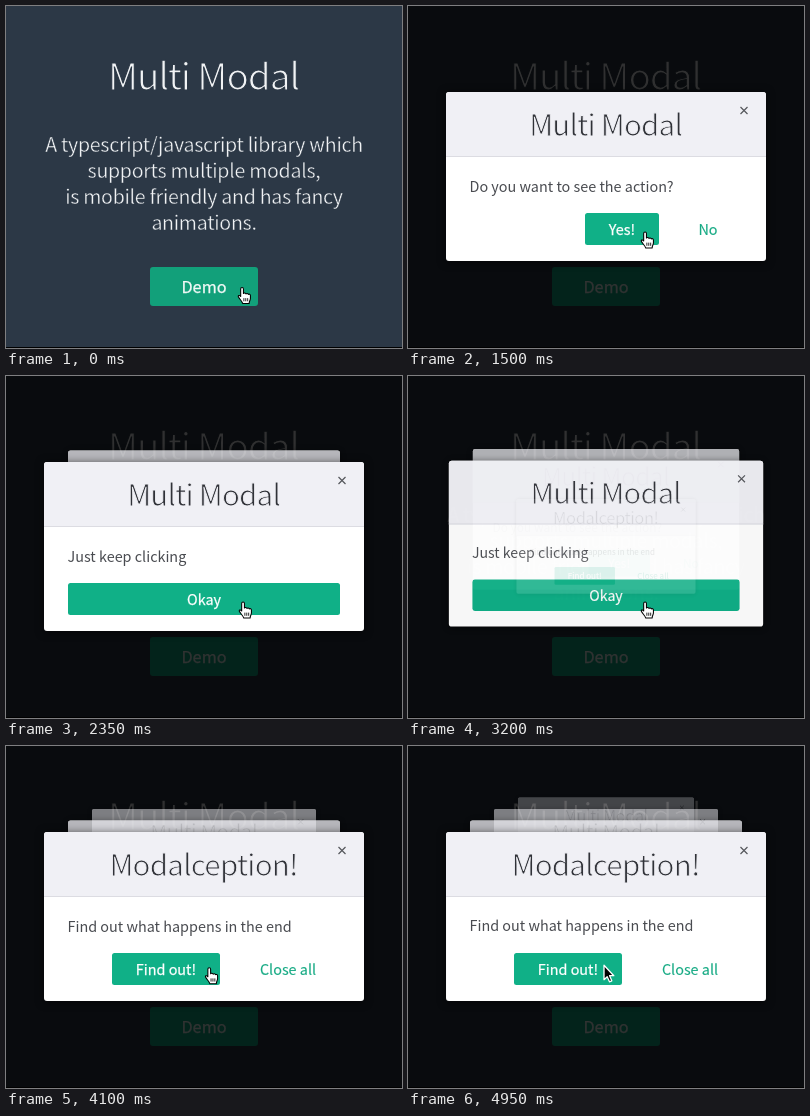
Write an HTML page that moves like this. It is 396 px wide and 342 px high and loops after 5000 ms.

```html
<!DOCTYPE html>
<html lang="en">
<head>
<meta charset="utf-8">
<title>Multi Modal</title>
<style>
  html, body { margin: 0; width: 100%; height: 100%; overflow: hidden; background: #2c3846; }
  svg { display: block; width: 396px; height: 342px; }
  text { font: 14.4px "Noto Sans CJK JP", "Noto Sans CJK SC", "Noto Sans CJK", sans-serif; fill: #494b50; }
  .mid { text-anchor: middle; }
  /* Strokes in the background colour thin the letters */
  .page { fill: #f1f3f5; stroke: #2c3846; }
  .title { letter-spacing: -.027em; }
  .page.title { font-size: 37px; stroke-width: 1.1px; }
  .page.intro { font-size: 19.6px; stroke-width: .35px; letter-spacing: -.015em; }
  .modal .title { font-size: 29.6px; fill: #303238; stroke: #f0f0f5; stroke-width: .9px; }
  .button { fill: #10b087; }
  .hover { fill: #12a07a; }
  .label { fill: #fff; stroke: #fff; stroke-width: .25px; }
  .demo { font-size: 16.3px; fill: #f1f8f6; }
  .link { fill: #18ab85; stroke: #18ab85; stroke-width: .15px; }
  .panel { fill: #fff; filter: drop-shadow(0 1px 4px #0009); }
</style>
</head>
<body>
<svg viewBox="0 0 396 342">
  <rect width="396" height="342" fill="#2c3846"/>
  <text class="page title mid" x="197.5" y="84">Multi Modal</text>
  <g id="intro"></g>
  <rect id="demo" x="144" y="261" width="108" height="39" rx="3"/>
  <text class="label demo mid" x="198" y="287">Demo</text>
  <rect id="shade" width="396" height="342"/>
  <g id="modals"></g>
  <g id="cursor" stroke-linejoin="round">
    <g id="hand" transform="translate(-3 2) scale(1.06)" stroke="#000">
      <path fill="#fff" d="M3 9V1.8a1.3 1.3 0 0 1 2.6 0V6.2c.3-.9 2.2-.8 2.4.3c.5-.7 2-.5 2.2.5c.6-.5 2-.2 2 1V10.5c0 2-1.2 3-1.2 5H4.8C4.5 13.5 2.2 11.8.9 9.5C.2 8.2 1.6 7.2 3 9z"/>
      <path stroke-width=".8" d="M6 10.5v3M7.8 10.5v3M9.6 10.5v3"/>
    </g>
    <path id="arrow" stroke="#fff" stroke-width="1.3" d="M.5 .8V15.2L3.7 12.2L6 17.3L8.3 16.3L6.1 11.2H10.3z"/>
  </g>
  <rect y="341" width="396" height="1"/>
</svg>
<script>
const LOOP = 5000, OPEN_TIME = 400, SHADE_TIME = 300;
const CX = 198, CY = 170.5;
const el = id => document.getElementById(id);

const text = (cls, x, y, str) => `<text class="${cls}" x="${x}" y="${y}">${str}</text>`;
const button = (x, w, str) =>
  `<rect class="button" x="${x}" y="207" width="${w}" height="32" rx="2.5"/>` +
  text("label mid", x + w / 2, 229, str);
const link = (x, str) => text("link mid", x, 229, str);

const modal = (title, message, actions) => `<g class="modal">
  <rect class="panel" x="38" y="86" width="320" height="169" rx="3"/>
  <path fill="#f0f0f5" d="M38 151V89a3 3 0 0 1 3-3H355a3 3 0 0 1 3 3V151z"/>
  <path stroke="#dcdce2" d="M38 150.5H358"/>
  <path stroke="#55575c" stroke-width="1.2" d="M332.5 101l7 7m0-7l-7 7"/>
  ${text("title mid", CX - .4, 129.8, title)}${text("", 61.5, 185.5, message)}${actions}</g>`;

el("intro").innerHTML = [
  "A typescript/javascript library which",
  "supports multiple modals,",
  "is mobile friendly and has fancy",
  "animations."
].map((line, i) => text("page intro mid", CX, 146 + 26 * i, line)).join("");

const finale = modal("Modalception!", "Find out what happens in the end",
  button(106, 108, "Find out!") + link(282, "Close all"));
el("modals").innerHTML =
  modal("Multi Modal", "Do you want to see the action?", button(177, 74, "Yes!") + link(300, "No")) +
  modal("Multi Modal", "Just keep clicking", button(62, 272, "Okay")) +
  finale + finale;

const modals = [...el("modals").children];
const openings = [720, 1900, 3155, 4560];

const clamp = x => Math.min(1, Math.max(0, x));
const smooth = x => x * x * (3 - 2 * x);
const span = (t, from, to) => clamp((t - from) / (to - from));

// CSS "ease": cubic-bezier(.25, .1, .25, 1)
function ease(x) {
  if (x <= 0 || x >= 1) return clamp(x);
  const curve = (u, a, b) => 3 * u * (1 - u) ** 2 * a + 3 * u * u * (1 - u) * b + u ** 3;
  let lo = 0, hi = 1;
  for (let i = 0; i < 20; i++) {
    const mid = (lo + hi) / 2;
    if (curve(mid, .25, .25) < x) lo = mid; else hi = mid;
  }
  return curve(lo, .1, 1);
}

function drawCursor(t) {
  const up = smooth(span(t, 1150, 1480));
  const left = smooth(span(t, 3650, 4250));
  const x = 234.5 + up - 40 * left;
  const y = 279 - 55.5 * up - 5 * left;
  const onDemo = t < openings[0];
  const onModal = up > .8 && left === 0;
  const onFindOut = x < 214 && t < openings[3];
  const isHand = onDemo || onModal || onFindOut;
  el("cursor").setAttribute("transform", `translate(${x} ${y})`);
  el("hand").style.display = isHand ? "" : "none";
  el("arrow").style.display = isHand ? "none" : "";
  el("demo").setAttribute("class", onDemo ? "hover" : "button");
}

function draw(now) {
  const t = now % LOOP;
  const shown = openings.map(start => ease((t - start) / OPEN_TIME));
  el("shade").setAttribute("opacity", .8 * ease((t - openings[0]) / SHADE_TIME));
  modals.forEach((node, i) => {
    // Each later modal pushes this one a level back
    const depth = shown.slice(i + 1).reduce((a, b) => a + b, 0);
    const scale = .5 + .5 * shown[i] - .15 * depth;
    node.setAttribute("transform",
      `translate(${CX} ${CY - 24.2 * depth}) scale(${scale}) translate(${-CX} ${-CY})`);
    node.setAttribute("opacity", shown[i] * (1 - .25 * depth));
  });
  drawCursor(t);
}

const begin = performance.now();
function tick() {
  draw(performance.now() - begin);
  requestAnimationFrame(tick);
}
tick();
</script>
</body>
</html>
```
